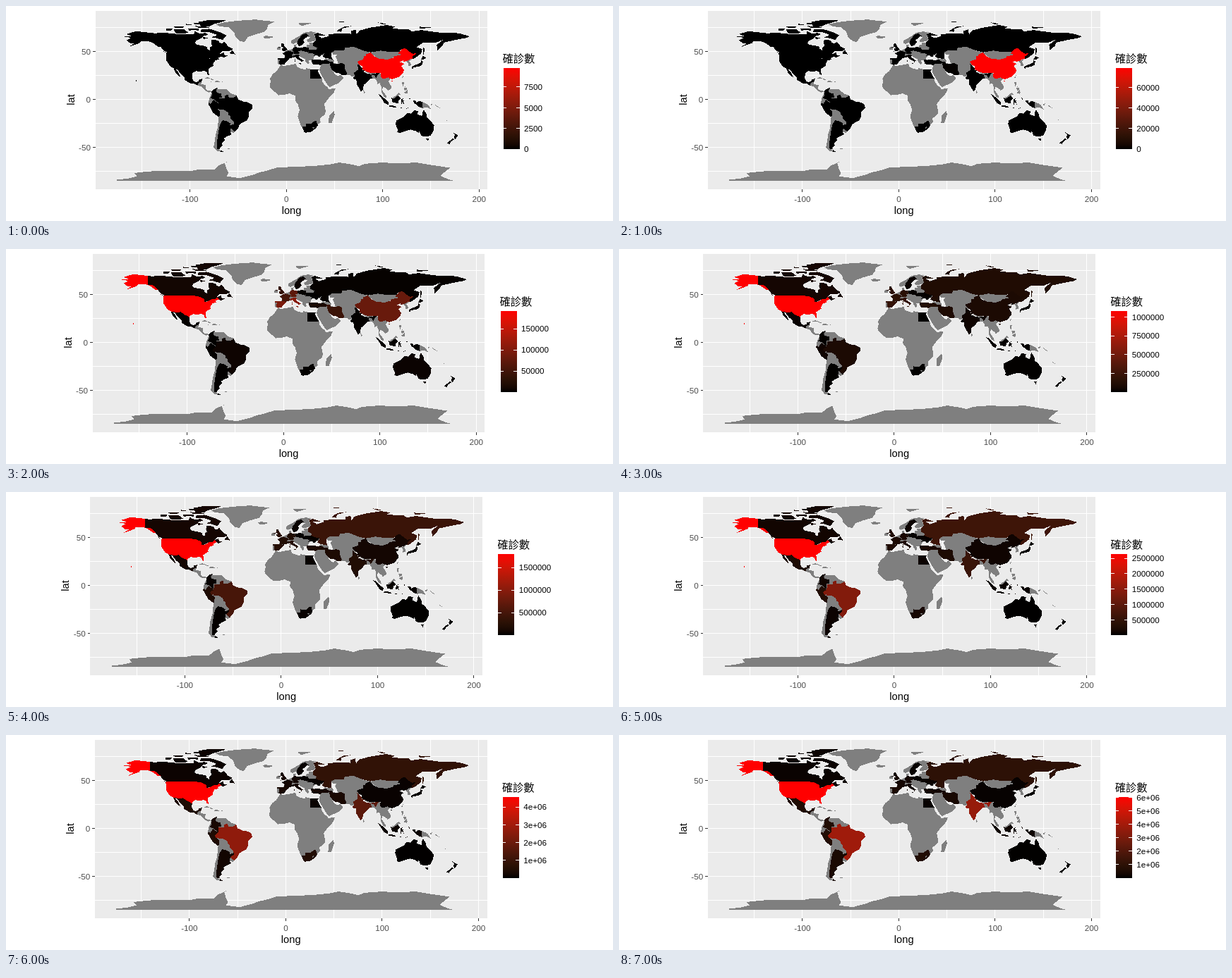
These frames come from a looping animation (860 by 305 pixels, 8 s). An HTML page:

```html
<!DOCTYPE html>
<html lang="zh-Hant">
<head>
<meta charset="utf-8">
<title>Map</title>
<style>
  html, body { margin: 0; width: 100%; height: 100%; overflow: hidden; background: #fff; }
  svg { display: block; width: 860px; height: 305px; }
  text { font: 11.7px "Liberation Sans", Arial, sans-serif; }
  .axis { fill: #4d4d4d; }
  .title { font-size: 14.67px; }
  .cjk { font: 15.3px "Noto Sans CJK TC", "Noto Sans CJK JP", "Noto Sans CJK", sans-serif; }
  .crisp { shape-rendering: crispEdges; }
</style>
</head>
<body>
<script>
// Land without data; coordinates are longitude and latitude
const noData = [
  // Greenland, Iceland, Svalbard
  'M-73 78.3-65 80.5-50 82.3-32 83.5-20 82-12 81.4-19 78-20 74-23 70.5-32 68-40 65.2-43.5 60-48 61-53 65.5-54 69.5-55 71-60 75.7-68 76zM-24 65.5-22 66.4-15 66.2-13.7 65-19 63.4-22.5 64zM12 79.5 20 80.3 27 80 20 78 16 76.8z',
  // Central America and the Caribbean
  'M-92.2 14.6-91 17.8-88 18.4-88.5 16-83.3 15-83.7 11-81 8.8-79.5 9.6-77.3 8-80.5 7.3-83.5 8.5-86 11-88 13.2zM-85 22-82 23.2-74.3 20.2-77.5 19.9-78 21.3zM-74.5 18.4-73 19.9-68.5 18.6-71 17.8zM-78.3 18.5-76.3 18-77 17.7zM-67 18.5-65.6 18.4-66 17.9z',
  // South America
  'M-77 8-75 10.8-71.5 12.2-71 11-62 10.6-57 6-51.5 4.2-52-5-53-33.5-55-35-58-34-64-40-70-52-67-55-72-54-75.5-50-74-42-73.5-37-71.4-30-70.2-18-76-13-81-5-80 1zM-61-51.5-58-51.4-60-52.2z',
  // Africa
  'M-6 35.8-2 35 10 37.2 11 34 15 32.2 20 31 20 32.8 25 31.6 34.2 31.2 32.6 29.8 35.6 24 37.2 21 37.5 18.5 39.5 15.3 43.2 12.3 44 10.6 51.2 11.8 49 6.5 44 1.3 39.3-5 40.6-10.7 40.5-15 35-20 35.5-24 32.8-26 31-30 26-33.8 20-34.8 18.3-33 15-27 11.8-18 13.7-11 12-5 9-1 9.5 4 5 5.5 4 6.3-2 4.8-8 4.4-13.3 9-16.7 12.4-17.3 14.8-16 19-17 21.5-14 26.5-10 29.5zM49.3-12 50.3-15.8 47-25 44-24.5 44.3-17z',
  // Europe
  'M-9 37-9 43-2 43.5-1.5 46-4.5 48.4 2 51 8 54 8 57 10.5 57.5 10 54.5 14 54 21 55 21.5 57.5 24 57.2 23.5 59.3 28 59.5 32 54 38 50 40 49 39 47 33.5 44.5 31 46.5 28.5 44 28 42 26 40.7 23 40.6 24 38 22.5 36.5 20 39.7 19.3 42 14 45 13 45.7 8 44 3.2 43 3 41.8-.3 39-2 36.8-5.5 36zM-10 52-6.3 52.2-6 54-8 55.2-10 54z',
  'M5 61.5 5 59 7 58 10.5 59.3 12 57 13 55.4 17 57 18 60 17 62 22 65.8 25 65 21.3 62 22 60.2 28 60.5 31 62.5 29.5 66 28.5 69 31 70 25.5 71 18 69.7 13 66z',
  // Western and central Asia
  'M36 36.5 40 41 41.5 41.6 40 43 48 41.8 49.5 40.5 48.9 38 54 37 52.5 41.5 51 44.5 53 46.8 49 46.5 47 49 51 51.5 60 51 61 54 70 55 80 51 87.5 49 80 42 74 39 77 35.5 74.5 31 70 27.8 71 24.5 68 23.7 66.5 25.3 57.3 25.7 56 27 51 28 48 30 50 27 51.5 25.5 54 24.2 56.2 26 59.7 22.4 55 17.5 45 12.8 42.8 15 39 21 35 28 34.5 31.3z',
  // Eastern Asia
  'M87 49 98 51 108 49.5 117 49.6 120 46.7 112 44 105 41 96 42zM124.4 40 130.5 42.4 127.5 39.7 129.4 37 129 35.2 126.3 34.6 126.5 37.5zM80 29.5 88 28 92 27.5 92 22 89 21.7 88 26.5zM80 9.7 81.8 7.5 80.3 6zM120 23 121.8 25.2 120.8 22z',
  'M92 21.5 92 25 97 28 102 22 105.5 23 108 21.5 105.8 19 109 13.5 109 11.5 105 8.7 105 10.3 100.7 13.4 99.3 10 103.5 3.8 104 1.4 101 3 98.5 8 98.6 13 97 17 94.3 16 94 19z',
  // Malay Archipelago
  'M109.5 1.8 113 3.3 117 7 119 5 116 4.3 112.5 1.2zM120 18.4 122.2 18 121.5 14 124 13 120.7 13.8zM122 7 125.5 9.7 126.3 7 125.3 5.7zM122 11.8 125 12.5 125 10.2 123 9zM141-2.6 145-4.3 147.5-6 150.5-10.5 146-8.5 141-9zM148.5-5.8 152-4 151-6zM154.5-5.5 161-10 156-7.5zM164-20 167-22.3 165.5-21.8z',
  // Antarctica
  'M-176-84-165-82.8-155-80.5-158-77-145-75.5-130-74.5-112-74.5-100-75-90-73-75-73.5-70-69-57-63.3-64-66.5-62-73-60-77-62-80.5-48-82.3-35-79-27-76-20-74.5-10-71.3 10-70.3 20-70 30-69.5 45-68 55-66 68-68 75-69.8 82-67.3 100-66 110-66.6 120-66.8 135-66 150-68.5 170-71.5 163-77 160-80 168-83.5 173-84.8-176-84.8z'
];

const caCases = [.004, .02, 8.5, 54.5, 92.5, 106, 118, 130];
const ruCases = [.002, .002, 2.3, 106, 405, 647, 838, 993];

// Outline and month-end cases in thousands
const countries = [
  // Canada: mainland, islands
  ['M-141 69.6-136 69-128 70-125 69.5-115 68.5-108 68-102 67.8-96 68-95 71.5-92 69.5-88 68.5-85 69.5-82 69-81.5 67.5-86 66.3-88 64-94 61-94.5 58.8-92.5 57-88 56.5-82.3 55-82 52.8-79.5 51.3-79 54.5-77 56-78 59-77.5 62.4-73.5 62.3-70 61-69.5 59-66 58.8-64.5 60.3-62 57.5-60 55-56 53-56 51.8-60 50.2-66.5 50.2-70 47-65 49-64.5 46.5-61 45.8-65.5 43.5-67 45-69 47.4-71 45.3-75 45-79 43-83 42-82.5 45.3-84.7 46.5-89 48-95 49-123 49-127.5 51-130 54.5-133 57-137 59-141 60.3z', caCases],
  ['M-80 73.7-76 72.7-68 70-62 67-64 65-66 62-72 64-78 65-73 66.5-73 68-79 70-89 70.5-88 73.5zM-117 73-106 73-102 70-105 68.8-115 69.3zM-125 74.3-118 74-120 71.5-125 72zM-91 81-80 83-62 82.5-70 80-76 78.5-80 76.2-89 76.5zM-95 76.8-80 75.7-80 74.6-91 74.7zM-117 76-106 76-108 74.8-115 74.8zM-102 73.7-91 74-91 72-96 72.5-101 72zM-87 65.5-81 64-86 63zM-59 48-56 51.5-53 47zM-96 80-87 80-89 78.3-95 78.3zM-104 79-98 78-104 77.5zM-128 50.7-124 48.5-126 49z', caCases],
  // United States
  ['M-141 69.6-156 71.3-166 68.3-161 66.3-168 65.6-161 64.5-166 61.8-162 58.8-157.5 58.8-164 54.7-152 59-151 61-146 60.8-141 60.3-137 58-133 55-130 55-135 59.6-141 60.4zM-124.5 48.3-123 49-95 49-88.5 48.2-84.5 46.5-82.5 45.3-82.5 42-79 42.8-76.5 44-75 45-71 45.3-69 47.4-67 45-70.5 43.3-70 41.7-74 40.6-76 37-75.7 35.2-81 31.8-80.2 25.5-81.8 26-82.8 29-85 29.7-89.5 29.2-94 29.6-97.3 27.5-97.2 25.9-99.5 27.5-103 29-106.5 31.8-111 31.3-117 32.5-120.6 34.6-124.3 40.3zM-156 20.2-155 19.5-155.8 19z', [.007, .024, 192, 1080, 1800, 2640, 4560, 6040]],
  // Mexico
  ['M-117 32.5-111 31.3-106.5 31.8-103 29-99.5 27.5-97.2 25.9-97.8 22.3-96 19-94 18.2-91 18.7-90.3 21-87 21.5-88 18.2-91 17.5-92.2 14.6-95 16.2-100 17-105.5 20.3-105.5 22.8-109.5 26.5-113 31.3-114.7 31.6-112 28-109.5 23-112 24.8-115 28z', [0, 0, 1.2, 19, 90, 226, 424, 599]],
  // Colombia
  ['M-77.5 8.5-75 10.8-71.5 12.2-73 9-72 7-67.5 6-67 1.5-70 1.5-70-4.2-75 0-78.8 1.5-77.3 4z', [0, 0, .9, 6.5, 29, 98, 295, 615]],
  // Peru
  ['M-80.3-3.4-78.5-4.8-75.3-.2-73-2.4-70-4.2-73-7-72-10-70.5-11-69-12.5-69.3-17-70.4-18.3-76-14-79.5-7.5-81.2-5z', [0, 0, 1, 37, 164, 285, 407, 652]],
  // Brazil
  ['M-51.5 4.2-50 0-44-2.5-40-3-35.2-5.5-35-9-39-13-39-18-41-22-48.5-26-50-30-53.5-33.7-57.5-30-54-26-54.3-24-58-20-58-17.5-60.2-16-60.5-13.5-65.3-10.5-69.5-11-70.5-9.5-72.5-10-73.8-7.3-70-4.2-69.5 1-67 1.2-64 1-64 4-60.5 5-59.5 1.5-56 2-54 2.3z', [0, 0, 5.7, 87, 514, 1402, 2662, 3908]],
  // Argentina
  ['M-66-22-62.5-22.3-58-25-58.6-27.3-54-25.6-54-27.5-57.6-30.2-58.3-34-56.8-36.5-62-39-65-41-63.7-42.7-67.5-46-66-48-69-51-68.4-52.3-72-51.5-72-45-71-38-70-31-68.4-25zM-68.6-52.7-65.3-54.7-68.6-54.8z', [0, 0, 1, 4.4, 16.8, 64, 191, 418]],
  // United Kingdom
  ['M-5.5 50 1.4 51.2 .3 53-2 55.8-3 58.6-5 58.5-5.5 55.3-3 54-4.8 53-5 51.7-3 51.3zM-8 54.5-5.5 54.4-6.5 55.2z', [.002, .06, 38, 178, 257, 284, 304, 337]],
  // France
  ['M-4.5 48.4-1.5 48.7-1.7 49.7 2 51 8 49 6 46.3 7.5 43.8 3.2 43 3 42.4-1.7 43.4-1.2 46zM8.7 42.5 9.4 43 9.2 41.4z', [.006, .1, 52.8, 167, 190, 202, 225, 316]],
  // Spain
  ['M-9 43-1.7 43.4 3 42.3 0 39-2 36.8-5.5 36-7.3 37.2-7 41.8-9 42z', [0, .045, 96, 213, 239, 249, 288, 463]],
  // Italy
  ['M7 44 7 45.8 12 47 13.6 45.7 12.3 44.5 18.4 40.2 16.5 39.7 16 38 15.5 40 11 42.4 9 44.3zM12.5 38 15.5 38.2 15 36.7zM8.3 41 9.7 40.9 9 39z', [.002, 1.1, 106, 205, 233, 240, 247, 269]],
  // Germany
  ['M6 51 7 53.5 9 54.8 14 54 15 51 12.3 50.2 13.5 48.7 12.5 47.6 7.6 47.6 8 49z', [.005, .08, 72, 163, 183, 195, 210, 244]],
  // Sweden
  ['M11.2 59 13 55.4 14.5 56 16.5 57 18.8 60 17.3 61.8 22 65.8 24 66 20.5 69 16 67.5 14 64.5 12 62z', [0, .01, 4.5, 21, 37, 68, 80, 84]],
  // Poland
  ['M14.2 53.9 18.5 54.7 23 54.3 24 50.6 22.5 49.2 15 51z', [0, 0, 2.3, 12.9, 23.8, 34, 45.7, 67]],
  // Ukraine
  ['M24 51.8 31 52 35 50.3 40 49.5 38 47.2 35 46.2 36.4 45.3 33.7 44.4 32.5 46.2 30 46 28 45.4 29.5 47 27 48.3 22.5 48.3z', [0, 0, .5, 10.4, 24, 45, 70, 124]],
  // Turkey
  ['M26.3 41.8 28 42 29.2 41.2 33 42 37 41 41.5 41.5 44.5 39.7 44.5 37.2 36.5 36.8 36 36 30 36.4 27.3 37 26.3 39.8z', [0, 0, 13.5, 120, 164, 199, 230, 270]],
  // Russia: mainland, islands
  ['M28 59.5 31 62.5 28.7 69 33 69.4 41 66.8 33 66.5 37 64 44 66.2 44 68.4 60 68.8 67 68.5 67 71.5 72 73 73 68 76 72 87 75 104 77.7 113 76 109 73.8 127 73.5 130 71 140 72.5 160 69.7 170 70 180 69 190 66 187 64.3 177 62.5 163.5 59.5 162 56 157 51 156 57 163 62.5 155 59.3 142 59.3 135 54.7 141 52.5 140 48 133 42.8 130.7 42.5 131 44.8 135 48.3 131 47.7 127.5 50 123.5 53.5 120 52.8 117 49.6 108 49.5 98 51 87.5 49.2 80 51 70 55 61 54 60 51 51 51.5 47 49 47 44.5 48 41.8 40 43.5 37.5 45 39 47.2 40 49.5 35 50.3 31 52 32 54 28 56z', ruCases],
  ['M52 71 55 73.5 60 76 68 76.8 58 74 57 70.7zM142 54 143.5 53.5 143 49 142 46zM95 80.5 104 79 100 78.3zM46 80.5 60 81.4 60 80.4zM138 76 150 75.2 139 73.7zM179 71.4 182 71.3 180 70.8z', ruCases],
  // Iran
  ['M44.3 39.6 48 39.6 49 37.5 54 37.2 57 38 61 36.5 61 31.5 63 27.2 61.6 25.2 57.3 25.7 56 27 51 28 48.5 30 46 33 45.5 36z', [0, .6, 44.6, 94.6, 151, 227, 304, 375]],
  // India
  ['M74 37 79 32.5 78.8 31 81 30.2 80 28.8 84 27 88 26.4 92 27 97 28.2 94.7 25 93 22 91.8 24.8 88.5 26 89 22 87 21.5 82.3 16.7 80.2 15 79.8 10.3 77.5 8 76 11 73 16 72.7 21 70.5 20.8 69 22.3 71 24.5 70 27.8 74.5 31z', [0, 0, 1.4, 35, 191, 585, 1696, 3691]],
  // China
  ['M73.6 39.5 80 42 80.3 45 82.5 45.3 83 47.2 87.5 49.1 91 45 96 42.7 105 41.6 111 43.5 112 45 119.8 46.7 116 47.9 120 52.8 123.5 53.5 127.5 50 131 47.7 135 48.3 131 44.8 131 42.9 124.4 40 121.3 39 121.5 40.8 118 39 122.5 37.2 119.3 35 122 31 121.5 28.3 117 23.5 110.3 21.2 108 21.5 105.5 23 101.5 21.5 99 22.3 97.7 24.2 98.5 27.8 92 27.8 86 28 81 30.2 78.8 31.5 79 34.5 76 36zM108.7 19.3 111 19.8 109.6 18.2z', [9.8, 79.3, 82, 84, 84.1, 84.8, 87.5, 89.9]],
  // Japan
  ['M130 33.8 132.5 35.5 136.5 37 139.5 38.5 140 41.2 141.8 39.5 140.7 35.8 136.5 34 132 33.7 131 31.3zM140 42 141.8 45.4 145.3 43.5 143 42z', [.02, .2, 2.2, 14, 16.7, 18.7, 36, 68]],
  // Indonesia
  ['M95.3 5.6 98 4.5 104-1 106-3 105.8-5.8 102-4 98.5 1.5zM105.3-6.7 111-6.5 114.5-7.8 114-8.7 106.5-7.4zM109 1.5 112.5 1.2 116 4.3 119 1 116.5-1 116-4 114.5-4 110.2-3zM119.5 .5 125 1.5 120.3 .5 121-.9 123.3-.8 121.5-2 122.5-5.3 120.3-2.8 119.5-5.5 118.9-2.8zM131-.8 134-.8 135-3.3 138-1.7 141-2.6 141-9 138-8 133-4zM116-8.3 123-8.4 119-9zM123.5-10.3 127-8.5 125-9zM127.5 1.5 128.7 1 128-.8zM128-3 130.8-3.5 128-3.5z', [0, 0, 1.5, 10, 26, 56, 108, 175]],
  // Australia
  ['M114-22 113.5-26 115.7-32 115-34.3 118-35 124-33 129-31.6 134-33 137.5-35 138-33 140-38 143.5-38.7 146.3-39 150-37.5 153-32 153.4-27 149.5-22.3 146-19 145.3-15 142.5-10.8 141.5-13 140.8-17.5 136-15.5 136.8-12.2 132.5-11.4 129.5-15 126-14 122.2-18zM144.7-40.8 148.2-40.8 147-43.6z', [.01, .025, 4.6, 6.8, 7.2, 7.9, 17, 25.7]],
  // New Zealand
  ['M172.8-34.5 178.4-37.7 175.2-41.6 173.8-39.3 175-37zM172.7-40.6 174.2-41.8 171-44 169.5-46.6 166.5-46z', [0, 0, .6, 1.5, 1.5, 1.5, 1.6, 1.7]],
  // Egypt
  ['M25 31.6 34.2 31.2 32.6 29.8 35.5 24 36.8 22 25 22z', [0, 0, .7, 5.5, 25, 68, 94, 99]],
  // South Africa
  ['M16.5-28.6 20-28.5 20-25 23-25.3 25.7-25.6 29.5-22.3 31.3-22.4 32-26 32.8-26.8 31-30 26-33.8 20-34.8 18.3-33.8z', [0, 0, 1.35, 5.6, 32.7, 151, 493, 627]]
];

// Scale maximum, label step (thousands), first label, horizontal shift
const months = [
  [9.8, 2.5, 0, 0], [79.3, 20, 0, -.8], [192, 50, 50, -4], [1080, 250, 250, -7.3],
  [1800, 500, 500, -7.3], [2640, 500, 500, -7.3], [4560, 1000, 1000, -.8], [6040, 1000, 1000, -.8]
];

const X0 = 397.2, Y0 = 132.5, SX = 1.365, SY = 1.357;
const BAR = { x: 704.5, top: 88, w: 23, h: 115 };

// Black to red, blended in CIE Lab
function ramp(t) {
  const fy = (53.24 * t + 16) / 116;
  const lin = f => f > .2069 ? f ** 3 : (f - .13793) / 7.787;
  const x = .95047 * lin(fy + .16018 * t), y = lin(fy), z = 1.0888 * lin(fy - .336 * t);
  const srgb = v => {
    v = Math.min(1, Math.max(0, v));
    return Math.round(255 * (v > .0031308 ? 1.055 * v ** (1 / 2.4) - .055 : 12.92 * v));
  };
  return `rgb(${srgb(3.2406 * x - 1.5372 * y - .4986 * z)},${
    srgb(-.9689 * x + 1.8758 * y + .0415 * z)},${srgb(.0557 * x - .204 * y + 1.057 * z)})`;
}

const px = lon => X0 + SX * lon, py = lat => Y0 - SY * lat;
const line = (x1, y1, x2, y2, c) => `<path d="M${x1} ${y1}L${x2} ${y2}" stroke="${c}"/>`;
const label = (x, y, s, cls = '', anchor = 'start', extra = '') =>
  `<text x="${x}" y="${y}" class="${cls}" text-anchor="${anchor}" ${extra}>${s}</text>`;

function frameSvg() {
  let grid = '', ticks = '', texts = '';
  for (let lon = -150; lon <= 200; lon += 50) {
    grid += line(px(lon), 7, px(lon), 260, '#fff');
    if (lon % 100 === 0) {
      ticks += line(px(lon), 260, px(lon), 264, '#333');
      texts += label(px(lon), 277.5, lon, 'axis', 'middle');
    }
  }
  for (let lat = -75; lat <= 75; lat += 25) {
    grid += line(126.6, py(lat), 682.4, py(lat), '#fff');
    if (lat % 50 === 0) {
      ticks += line(123, py(lat), 126.6, py(lat), '#333');
      texts += label(120, py(lat) + 4.5, lat, 'axis', 'end');
    }
  }
  texts += label(404.5, 295, 'long', 'title', 'middle') +
    label(0, 0, 'lat', 'title', 'middle', 'transform="translate(96.5 133) rotate(-90)"') +
    label(703.5, 80, '確診數', 'cjk');

  let stops = '';
  for (let i = 0; i <= 19; i++) stops += `<stop offset="${i / 19}" stop-color="${ramp(i / 19)}"/>`;
  return `<svg viewBox="0 0 860 305"><defs><linearGradient id="ramp" x1="0" y1="1" x2="0" y2="0">${stops}</linearGradient></defs>
    <g id="plot"><g class="crisp"><rect x="126.6" y="7" width="555.8" height="253" fill="#ebebeb"/>${grid}
    <g transform="translate(${X0} ${Y0}) scale(${SX} ${-SY})"><path fill="#7f7f7f" d="${noData.join('')}"/>
    ${countries.map(c => `<path class="land" d="${c[0]}"/>`).join('')}
    <path fill="#7f7f7f" d="M27-29.6 28.7-28.6 29.3-29.8 28-30.6z"/></g>${ticks}
    <rect x="${BAR.x}" y="${BAR.top}" width="${BAR.w}" height="${BAR.h}" fill="url(#ramp)"/></g>
    ${texts}<g id="scale"></g></g></svg>`;
}

document.body.innerHTML = frameSvg();
const plot = document.getElementById('plot');
const scale = document.getElementById('scale');
const lands = [...document.querySelectorAll('.land')];

function show(m) {
  const [max, step, first, dx] = months[m];
  plot.setAttribute('transform', `translate(${dx} 0)`);
  lands.forEach((el, i) => el.setAttribute('fill', ramp(countries[i][1][m] / max)));
  let out = '';
  for (let v = first; v <= max; v += step) {
    const y = BAR.top + BAR.h * (1 - v / max), r = BAR.x + BAR.w;
    out += `<g class="crisp">${line(BAR.x, y, BAR.x + 4.6, y, '#fff')}${line(r - 4.6, y, r, y, '#fff')}</g>` +
      label(734, y + 4.3, step === 1000 ? `${v / 1000}e+06` : v * 1000);
  }
  scale.innerHTML = out;
}

const start = performance.now();
let current = -1;
function tick() {
  const m = Math.floor((performance.now() - start) / 1000) % months.length;
  if (m !== current) show(current = m);
  requestAnimationFrame(tick);
}
tick();
</script>
</body>
</html>
```
